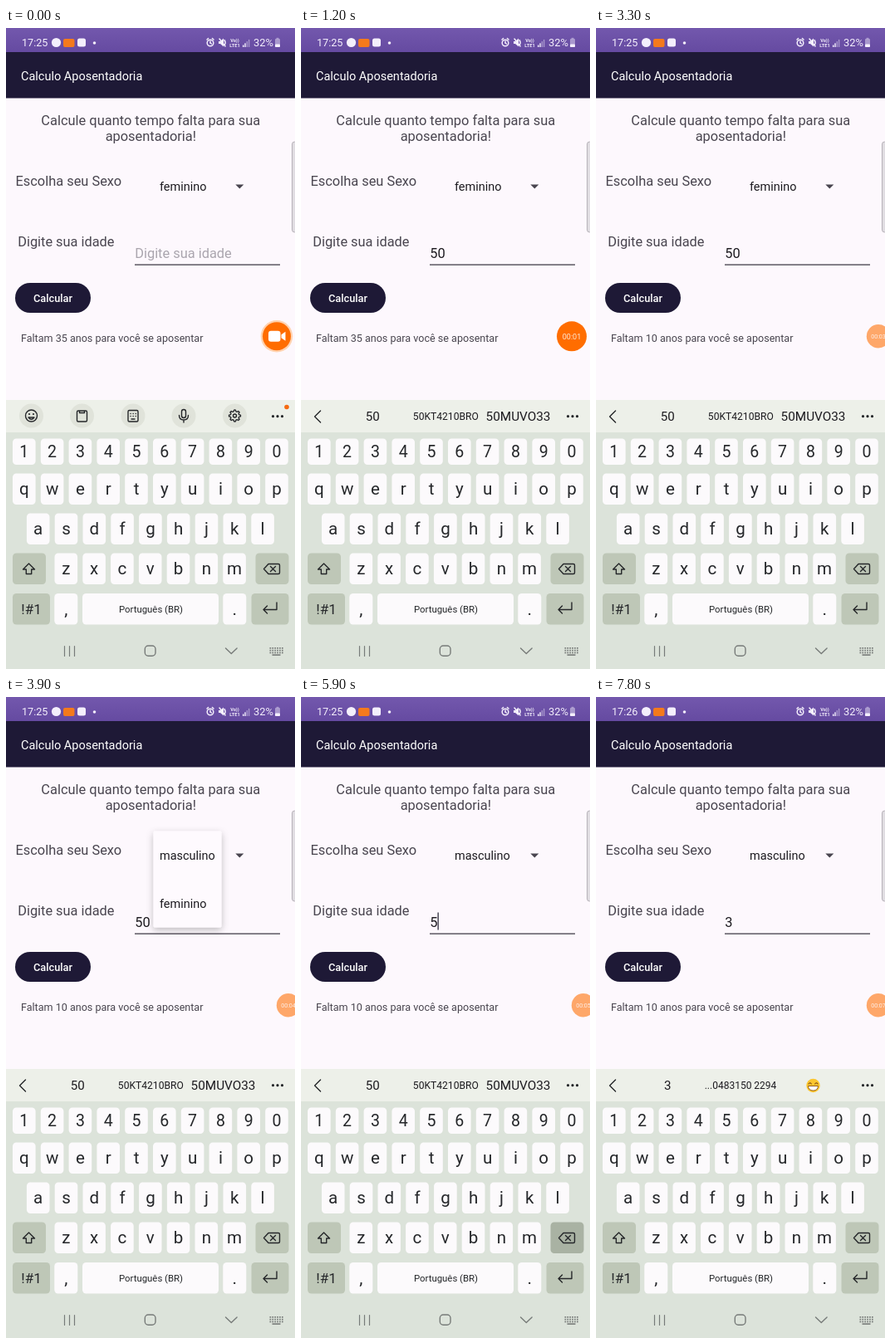
Recreate the animation shown at these times as an HTML page. Size 348 by 772 pixels, loop 8000 ms.

```html
<!DOCTYPE html>
<html lang="pt-BR">
<head>
<meta charset="utf-8">
<title>Calculo Aposentadoria</title>
<style>
  html, body { margin: 0; width: 100%; height: 100%; overflow: hidden; background: #fdf8fd; }
  svg { display: block; width: 348px; height: 772px; font-family: Roboto, "Noto Sans", sans-serif; }
  .line { fill: none; stroke: #25272a; stroke-width: 1.4; stroke-linecap: round; stroke-linejoin: round; }
</style>
</head>
<body>
<svg id="stage" viewBox="0 0 348 772" xmlns="http://www.w3.org/2000/svg"></svg>
<script>
const LOOP = 8000;
const INK = '#1e1936', TEXT = '#49454f', DARK = '#1d1b20', KEY_INK = '#25272a';
const KEY = '#fcfafc', SPECIAL = '#bec7b7', ORANGE = '#ff6d00';

const text = (x, y, size, content, fill = DARK, extra = '') =>
  `<text x="${x}" y="${y}" font-size="${size}" fill="${fill}" ${extra}>${content}</text>`;
const mid = (x, y, size, content, fill = DARK, extra = '') =>
  text(x, y, size, content, fill, `text-anchor="middle" ${extra}`);
const rect = (x, y, w, h, fill, rx = 0, extra = '') =>
  `<rect x="${x}" y="${y}" width="${w}" height="${h}" rx="${rx}" fill="${fill}" ${extra}/>`;
const circle = (x, y, r, fill, extra = '') => `<circle cx="${x}" cy="${y}" r="${r}" fill="${fill}" ${extra}/>`;
const line = (d, extra = '') => `<path class="line" d="${d}" ${extra}/>`;
const group = (id, content, extra = '') => `<g id="${id}" ${extra}>${content}</g>`;

function statusBar() {
  const w = '#f4effc';
  const signal = [0, 1, 2, 3].map(i =>
    rect(285 + i * 2.3, 20.5 - i * 2.2, 1.4, 2.5 + i * 2.2, w, 0, i > 1 ? 'opacity=".45"' : '')).join('');
  return rect(0, 0, 348, 29, 'url(#bar)') +
    text(19, 22, 12.6, '17:25', w, 'id="clock"') +
    circle(60.5, 17.5, 5.6, w) + rect(69, 13, 13.5, 10, '#f47a1c', 2) +
    rect(86, 12.5, 10, 10, w, 2.5) + circle(106.5, 18, 1.8, w) +
    `<g fill="none" stroke="${w}" stroke-width="1.5" stroke-linecap="round">
       <circle cx="246" cy="18" r="3.8"/><path d="M246 16v2l1.4 1M242 14l1.6-1.5M250 14l-1.6-1.5"/>
       <path d="M257 13l7 9M263 14.5q2 3 .3 6"/></g>
     <path d="M256 16h2l4-3.5v10l-4-3.5h-2z" fill="${w}"/>` +
    mid(275.5, 16.6, 5.6, 'Vo))', w, 'font-weight="700"') + mid(275.5, 23, 5.6, 'LTE1', w, 'font-weight="700"') +
    signal + text(298, 22, 12.9, '32%', w) +
    rect(324, 13, 6, 10, w, 1, 'opacity=".45"') + rect(325.5, 11.8, 3, 1.5, w, 0, 'opacity=".45"') +
    rect(324, 19.5, 6, 3.5, w, 1);
}

function form() {
  return rect(0, 29, 348, 55.5, INK) + text(18, 62.5, 14.5, 'Calculo Aposentadoria', '#fff') +
    mid(174.3, 116.5, 16.42, 'Calcule quanto tempo falta para sua', TEXT) +
    mid(174.3, 135.5, 16.42, 'aposentadoria!', TEXT) +
    text(11.5, 190, 16.4, 'Escolha seu Sexo', TEXT) +
    text(185, 196.3, 14.45, '', DARK, 'id="gender"') +
    `<path d="M276.3 188.5h10l-5 5z" fill="${TEXT}"/>` +
    text(14.2, 262.5, 16.35, 'Digite sua idade', TEXT) +
    text(155.2, 276.5, 16.4, '', DARK, 'id="age"') +
    rect(155, 284.4, 175, 1.5, '#5d5963') +
    rect(0, 259.5, 1.5, 21, '#4b4857', 0, 'id="caret"') +
    group('handle', `<path d="M174.6 283l6 4.6a8.6 8.6 0 1 1-12 0z" fill="${INK}"/>`) +
    rect(11, 307, 91, 36, INK, 18) + rect(11, 307, 91, 36, '#fff', 18, 'id="ripple"') +
    mid(56.5, 330, 12.8, 'Calcular', '#fff', 'font-weight="500"') +
    text(18, 378.3, 12.57, '', TEXT, 'id="result"') +
    rect(344.5, 137, 10, 109, '#e0dde2', 3, 'stroke="#aaa6ad" stroke-width=".8"');
}

function popup() {
  return group('popup', rect(177.5, 161.5, 82, 116, '#fefafe', 2, 'filter="url(#shadow)"') +
    rect(177.5, 162, 82, 58, '#dcd7df', 0, 'id="chosen"') +
    text(185, 196.3, 14.45, 'masculino') + text(185, 254.3, 14.45, 'feminino'));
}

function recorder() {
  return group('recorder',
    group('camera', circle(0, 0, 19.2, '#ffd2ae') + circle(0, 0, 17, ORANGE) +
      rect(-10, -6.5, 14.5, 13, '#fff', 3) + '<path d="M5.5-2l5-3.5v11l-5-3.5z" fill="#fff"/>') +
    group('counter', circle(0, 0, 18, ORANGE) + mid(0, 3.3, 9, '', '#ffeadb', 'id="seconds"')));
}

function toolbar() {
  const gear = Array.from({ length: 48 }, (_, i) => {
    const a = i * Math.PI / 24, r = 6.1 + .9 * Math.tanh(3 * Math.cos(8 * a));
    return `${(275.5 + r * Math.cos(a)).toFixed(1)} ${(467 + r * Math.sin(a)).toFixed(1)}`;
  }).join('L');
  return [30.5, 91.5, 153, 214, 275.5].map(x => circle(x, 467, 14.5, '#e0e3da')).join('') +
    line('M37.5 467a7 7 0 1 1-14 0a7 7 0 1 1 14 0M27 469q3.5 4.500 7 0z') +
    circle(28, 465, 1.1, KEY_INK) + circle(33, 465, 1.1, KEY_INK) +
    line('M87 461h9q1.500 0 1.500 1.500v10q0 1.500-1.500 1.500h-9q-1.500 0-1.500-1.500v-10q0-1.500 1.500-1.500M88.500 461v2.500h6v-2.500') +
    line('M148.500 460.500h9q1.500 0 1.500 1.500v10.500q0 1.500-1.500 1.500h-9q-1.500 0-1.500-1.500v-10.500q0-1.500 1.500-1.500') +
    line('M150 464.500h.1m3 0h.1m3 0h.1M150 467.500h.1m3 0h.1m3 0h.1M151 471h4') +
    rect(211.5, 459.5, 5, 10, 'none', 2.5, 'class="line"') + line('M208.500 466.500q0 5.500 5.500 5.500t5.500-5.500M214 472v3') +
    line(`M${gear}z`) + circle(275.5, 467, 2, 'none', 'class="line"') +
    circle(338, 456.5, 2.8, '#f56a12');
}

function suggestions() {
  const emoji = circle(261.5, 468, 8.2, '#fbc62f') +
    '<path d="M255.500 468.500h12q-.500 5.500-6 5.500t-6-5.500z" fill="#fff" stroke="#8a5215" stroke-width=".9"/>' +
    line('M256 466q1.500-2.500 3.300 0M263.700 466q1.500-2.500 3.300 0', 'style="stroke:#7a4510;stroke-width:1.1"');
  return line('M23.500 461l-7 7 7 7') + mid(86.3, 473.3, 15.1, '', DARK, 'id="first"') +
    group('models', mid(174.3, 472, 12.1, '50KT4210BRO') + mid(261.5, 473.3, 15.3, '50MUVO33')) +
    group('others', mid(174, 472, 12, '...0483150 2294') + emoji);
}

function keyboard() {
  const key = (x, y, w, h, fill, id = '') => rect(x, y, w, h, fill, 4.5, id && `id="${id}"`);
  const row = (chars, x0, y, h, size) => [...chars].map((c, i) => {
    const x = x0 + i * 33.8;
    return key(x - 13.8, y, 27.6, h, KEY, 'key-' + c) + mid(x, y + h / 2 + size * .35, size, c, KEY_INK);
  }).join('');
  return rect(0, 448, 348, 324, '#dce3da') + rect(0, 448, 348, 39, '#edf0e9') +
    group('toolbar', toolbar()) + group('suggestions', suggestions()) +
    [321.5, 327, 332.5].map(x => circle(x, 467.7, 1.6, KEY_INK)).join('') +
    row('1234567890', 21.8, 494.5, 31.5, 19.5) + row('qwertyuiop', 21.8, 536.5, 37.5, 20.5) +
    row('asdfghjkl', 38.7, 584.5, 37.5, 20.5) + row('zxcvbnm', 72.3, 632.5, 37.5, 20.5) +
    key(8, 632.5, 40, 37.5, SPECIAL) + line('M27.500 645l-7 7h3.800v5.500h6.400v-5.500h3.800z') +
    key(300.5, 632.5, 40, 37.5, SPECIAL, 'key-back') +
    line('M316 645.500h12q1.500 0 1.500 1.500v9q0 1.500-1.500 1.500h-12l-5.500-6zM318.500 648.500l6 6m0-6l-6 6') +
    key(8, 681, 45, 37.5, SPECIAL) + mid(30.5, 705.5, 17, '!#1', KEY_INK) +
    key(58.3, 681, 28, 37.5, KEY) + mid(72.3, 707, 21, ',', KEY_INK) +
    key(92, 681, 164, 37.5, KEY) + mid(174.5, 703.8, 11.4, 'Português (BR)', KEY_INK) +
    key(261.3, 681, 28, 37.5, KEY) + mid(275.3, 707, 21, '.', KEY_INK) +
    key(295.5, 681, 45, 37.5, SPECIAL) + line('M326 692v8.500h-16m4.500-4.500l-4.500 4.500 4.500 4.500') +
    `<g opacity=".55">` + line('M70.500 744.500v12M76.500 744.500v12M82.500 744.500v12', 'style="stroke-width:1.200"') +
    rect(167.3, 744, 12.7, 12.3, 'none', 4, 'class="line"') + line('M264.500 747l6.800 6.500 6.800-6.500') +
    [0, 1, 2].map(r => [0, 1, 2, 3, 4, 5].map(c => rect(317.5 + c * 2.9, 746 + r * 2.8, 1.7, 1.7, KEY_INK)).join('')).join('') +
    rect(320.5, 754.3, 10, 1.6, KEY_INK) + '</g>';
}

const stage = document.getElementById('stage');
stage.innerHTML = `<defs>
  <linearGradient id="bar" x2="0" y2="1"><stop stop-color="#7358ad"/><stop offset="1" stop-color="#654aa1"/></linearGradient>
  <filter id="shadow" x="-30%" y="-30%" width="160%" height="160%">
    <feDropShadow dx="0" dy="3" stdDeviation="4" flood-color="#000" flood-opacity=".25"/></filter></defs>` +
  rect(0, 0, 348, 772, '#fdf8fd') + statusBar() + form() + popup() + keyboard() + recorder();

const $ = id => document.getElementById(id);
const within = (t, ...spans) => spans.some(([a, b]) => t >= a && t < b);
const ramp = (t, a, b) => Math.min(1, Math.max(0, (t - a) / (b - a)));
const smooth = p => p * p * (3 - 2 * p);
const show = (id, on) => $(id).setAttribute('visibility', on ? 'visible' : 'hidden');
const fade = (id, value) => $(id).setAttribute('opacity', value);
const latest = (t, steps) => steps.filter(([at]) => t >= at).pop()[1];

const AGE = [[0, ''], [400, '5'], [700, '50'], [5900, '5'], [6100, ''], [7300, '3']];
const HINT = [[0, ''], [500, '5'], [1000, '50'], [6000, '5'], [6200, ''], [7500, '3']];
const SECONDS = [0, 1000, 2100, 3100, 3800, 4900, 6500, 7600];
const PRESSES = { 'key-5': [[300, 450]], 'key-0': [[600, 750]], 'key-back': [[5900, 6000], [6100, 6200]], 'key-3': [[7200, 7400]] };

function draw(t) {
  $('clock').textContent = t < 6000 ? '17:25' : '17:26';
  $('gender').textContent = t < 4700 ? 'feminino' : 'masculino';
  $('result').textContent = `Faltam ${t < 1800 ? 35 : 10} anos para você se aposentar`;

  const age = latest(t, AGE);
  $('age').textContent = age || 'Digite sua idade';
  $('age').setAttribute('fill', age ? DARK : '#aaa5ae');
  $('caret').setAttribute('x', 155.2 + age.length * 9.2);
  show('caret', within(t, [200, 1200], [1700, 2200], [2700, 3200], [4700, 5200], [5500, 6600], [7200, 7800]));
  show('handle', within(t, [5500, 5900]));
  fade('ripple', within(t, [1600, 2000]) ? .22 * (1 - ramp(t, 1700, 2000)) : 0);

  fade('popup', ramp(t, 3500, 3800) * (1 - ramp(t, 4700, 4950)));
  show('chosen', within(t, [4600, 4900]));

  const hint = latest(t, HINT);
  fade('toolbar', hint ? 0 : 1);
  fade('suggestions', hint ? 1 : 0);
  $('first').textContent = hint;
  show('models', hint === '50');
  show('others', hint === '3');
  for (const [id, spans] of Object.entries(PRESSES)) {
    const base = id === 'key-back' ? SPECIAL : KEY;
    $(id).setAttribute('fill', within(t, ...spans) ? '#a9b2a3' : base);
  }

  const dock = smooth(ramp(t, 1850, 2200));
  $('recorder').setAttribute('transform', `translate(${326 + 14 * dock} 371.300) scale(${1 - .21 * dock})`);
  fade('recorder', 1 - .42 * dock);
  const flip = ramp(t, 100, 300);
  fade('camera', 1 - flip);
  fade('counter', flip);
  $('seconds').textContent = '00:0' + (SECONDS.filter(at => t >= at).length - 1);
}

const start = performance.now();
function tick() {
  draw((performance.now() - start) % LOOP);
  requestAnimationFrame(tick);
}
tick();
</script>
</body>
</html>
```
